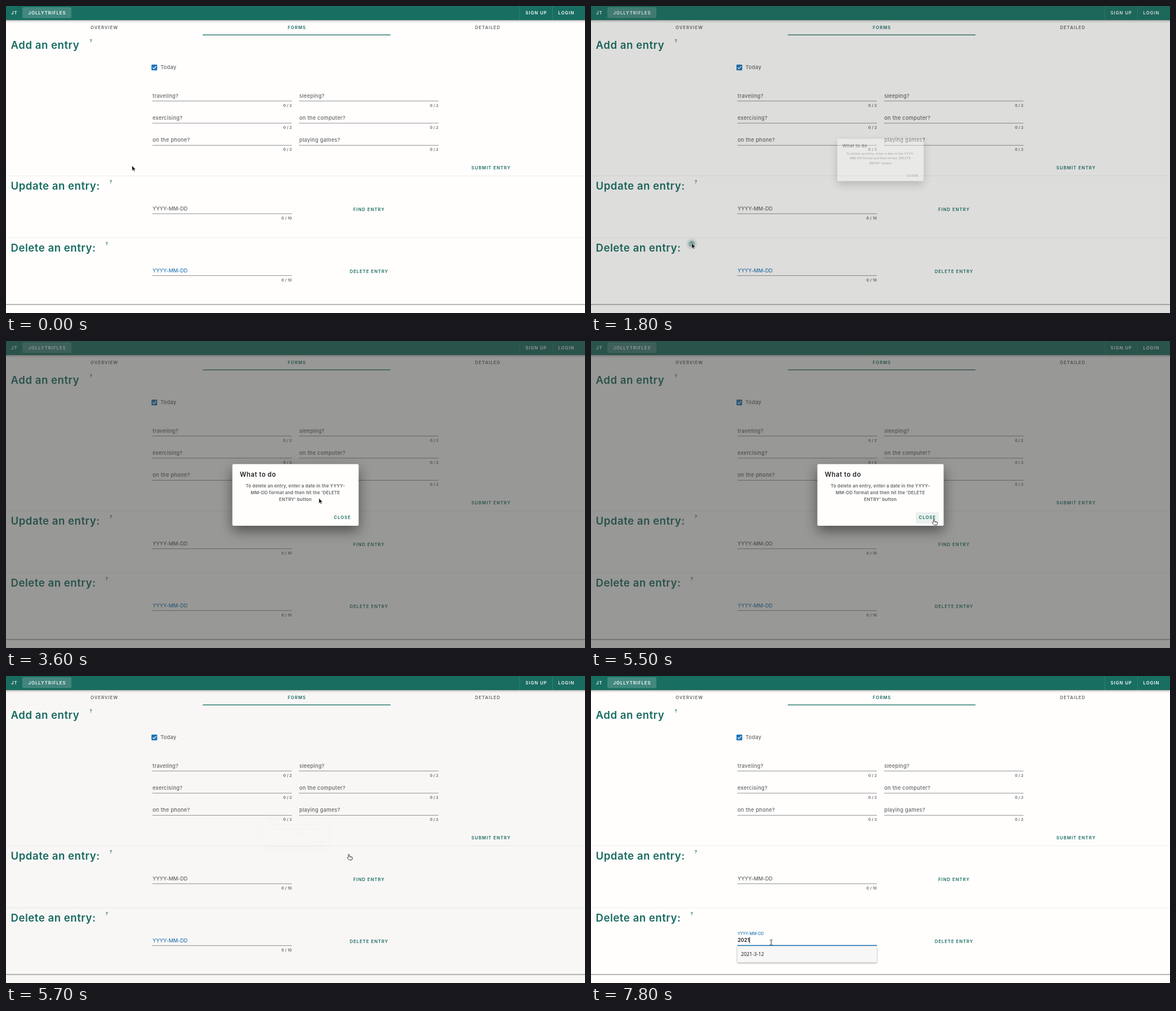
Recreate the animation shown at these times as an HTML page. Size 1027x545 px, loop 8000 ms.

```html
<!DOCTYPE html>
<html lang="en">
<head>
<meta charset="utf-8">
<title>Entry forms</title>
<style>
  html, body { margin: 0; width: 100%; height: 100%; overflow: hidden; background: #fffefd; }
  svg { display: block; width: 1027px; height: 545px; }
  text { font-family: Inter, sans-serif; font-weight: 600; white-space: pre; }
  .title { font-size: 18.6px; letter-spacing: .52px; fill: #176b60; }
  .button { font-size: 7.7px; letter-spacing: 1px; fill: #176b60; }
  .label { font-size: 9.2px; letter-spacing: .3px; fill: #666; font-weight: 550; }
  .date { letter-spacing: -.15px; }
  .count { font-size: 6.8px; letter-spacing: .1px; fill: #666; text-anchor: end; }
  .help { font-size: 8px; fill: #176b60; }
  .mid { text-anchor: middle; }
  .white { fill: #fff; }
  .grey { fill: #666; }
  .heading { font-size: 11.3px; letter-spacing: .5px; fill: #222; }
  .body { font-size: 7.9px; letter-spacing: .17px; fill: #666; }
  .typed { font-size: 9px; fill: #1c1c1c; }
  .option { font: 8.8px "Noto Sans", sans-serif; fill: #222; }
  .card { fill: #fffefd; filter: drop-shadow(0 1px 1px #0008); }
  .bar { fill: #186e61; filter: drop-shadow(0 1px 2px #0006); }
  .panel { fill: #fffefd; filter: drop-shadow(0 9px 11px #0007); }
  .menu { fill: #f8f7f7; filter: drop-shadow(0 1px 1.5px #0006); }
</style>
</head>
<body>
<svg id="stage" viewBox="0 0 1027 545"></svg>
<script>
const text = (x, y, cls, str, id = '') => `<text x="${x}" y="${y}" class="${cls}" id="${id}">${str}</text>`;
const rect = (x, y, w, h, attrs) => `<rect x="${x}" y="${y}" width="${w}" height="${h}" ${attrs}/>`;

function field(x, y, label, max, id = '') {
  const cls = max === 10 ? 'label date' : 'label';
  return text(0, 0, cls, label, id).replace('<text', `<text transform="translate(${x} ${y - 6})"`)
    + rect(x - .5, y - .5, 247.5, 1, 'fill="#939291"')
    + text(x + 247, y + 10, 'count', `0 / ${max}`);
}

function section(y, title, helpX) {
  return text(8.5, y, 'title', title) + text(helpX, y - 11, 'help mid', '?');
}

const questions = ['traveling?', 'sleeping?', 'exercising?', 'on the computer?', 'on the phone?', 'playing games?'];

const page = rect(-10, -10, 1047, 539, 'class="card"')
  + rect(-10, -5, 1047, 30, 'class="bar"')
  + rect(29, 2, 87, 19.5, 'rx="2.5" fill="#fff" opacity=".18"')
  + rect(910.5, 0, 1, 25, 'fill="#fff" opacity=".12"') + rect(969, 0, 1, 25, 'fill="#fff" opacity=".12"')
  + text(9, 14.8, 'button white', 'JT')
  + text(73, 14.8, 'button white mid', 'JOLLYTRIFLES')
  + text(921.5, 14.8, 'button white', 'SIGN UP')
  + text(979.5, 14.8, 'button white', 'LOGIN')
  + text(174.5, 41.4, 'button grey mid', 'OVERVIEW')
  + text(516, 41.4, 'button mid', 'FORMS')
  + text(854.5, 41.4, 'button grey mid', 'DETAILED')
  + rect(349, 50.7, 333, 1.3, 'fill="#176b60"')
  + section(76, 'Add an entry', 150.5) + section(326, 'Update an entry:', 186) + section(436.3, 'Delete an entry:', 178.7)
  + rect(258, 104, 10.2, 10.2, 'rx="1.2" fill="#1f75bb"')
  + '<path d="M260 109.2l2.2 2.2 4.2-4.4" fill="none" stroke="#fff" stroke-width="1.2"/>'
  + text(274, 112, 'label', 'Today')
  + questions.map((q, i) => field(260 + 260.2 * (i % 2), 168.7 + 39.3 * (i >> 1), q, 2)).join('')
  + text(860.5, 290, 'button mid', 'SUBMIT ENTRY')
  + rect(0, 301, 1027, 1, 'fill="#eeedeb"') + rect(0, 411, 1027, 1, 'fill="#eeedeb"')
  + field(260, 368.8, 'YYYY-MM-DD', 10) + text(644, 364, 'button mid', 'FIND ENTRY')
  + field(260, 478.6, 'YYYY-MM-DD', 10, 'dateLabel') + text(644, 474, 'button mid', 'DELETE ENTRY')
  + rect(259.5, 477.6, 247.5, 1.5, 'id="focusLine" fill="#1f75b4"')
  + text(260, 472.2, 'typed', '', 'typed')
  + rect(0, 463.5, .8, 11, 'id="caret"')
  + `<g id="menu">${rect(259.5, 480, 247.5, 28.5, 'class="menu"')}${text(266, 497.4, 'option', '2021-3-12')}</g>`
  + '<g fill="#176b60"><circle id="hover" cx="178.7" cy="422.2" r="9.8"/><circle id="ripple" cx="178.7" cy="422.2"/></g>';

const dialog = rect(401.5, 218.5, 224, 109.5, 'rx="2.2" class="panel"')
  + text(414.8, 240.6, 'heading', 'What to do')
  + ['To delete an entry, enter a date in the YYYY-', "MM-DD format and then hit the 'DELETE", "ENTRY' button"]
    .map((line, i) => text(513.3, 259.8 + 12.25 * i, 'body mid', line)).join('')
  + rect(576, 304, 41, 20, 'id="closeHover" rx="2" fill="#176b60"')
  + text(596.8, 316.4, 'button mid', 'CLOSE');

const cursors = {
  arrow: '<path d="M0 0V9.4L2.2 7.4 3.6 10.7 5.1 10 3.7 6.9H6.6Z" fill="#111" stroke="#fff" stroke-width=".6"/>',
  hand: '<path d="M3 6.2V1.5a.9.9 0 0 1 1.9 0V4.4l4.1.8q1.3.3 1.2 1.6L9.8 9l-.7 1.6H4.4L.8 7q.3-1.1 1.4-.6Z" fill="#fff" stroke="#222" stroke-width=".9"/><path d="M6.4 5v1.5M8.1 5.3v1.4" stroke="#222" stroke-width=".6"/>',
  beam: '<path d="M-2.5-4.7Q0-4.7 0-3.5Q0-4.7 2.5-4.7M0-3.6V3.6M-2.5 4.7Q0 4.7 0 3.5Q0 4.7 2.5 4.7" fill="none" stroke="#222" stroke-width=".9"/>',
};

document.getElementById('stage').innerHTML = page
  + rect(0, 0, 1027, 545, 'id="shade" fill="#3a3c38"')
  + `<g id="dialog">${dialog}</g><g id="cursor"></g>`;

const el = Object.fromEntries([...document.querySelectorAll('[id]')].filter(e => e.id).map(e => [e.id, e]));
const set = (name, attrs) => { for (const k in attrs) el[name].setAttribute(k, attrs[k]); };
const ramp = (t, from, length) => Math.min(1, Math.max(0, (t - from) / length));

// Cubic Bezier easing (.25, .8, x2, 1)
function ease(p, x2) {
  let lo = 0, hi = 1;
  const at = (u, a, b) => 3 * a * u * (1 - u) ** 2 + 3 * b * u * u * (1 - u) + u ** 3;
  for (let i = 0; i < 25; i++) {
    const mid = (lo + hi) / 2;
    if (at(mid, .25, x2) < p) lo = mid; else hi = mid;
  }
  return at(hi, .8, 1);
}

// time, x, y and, where it changes, the cursor shape
const path = [
  [0, 223.5, 283.3, 'arrow'], [400, 223.5, 283.3], [600, 227, 318], [700, 216.5, 346.5], [1000, 216.5, 346.5],
  [1100, 183, 414, 'hand'], [1200, 183, 414], [1300, 177, 420.5], [1400, 177, 420.5],
  [1500, 178.7, 421, 'arrow'], [1800, 178.7, 421], [1900, 177, 420.6], [2000, 177, 420.6],
  [2500, 500, 295], [2700, 500, 295], [3100, 421, 243], [3200, 421, 243], [3600, 555, 279],
  [3900, 574.5, 302, 'hand'], [4200, 574.5, 302], [4500, 598, 310], [4600, 598, 310],
  [5000, 585, 321], [5300, 598, 320], [5500, 604.3, 316], [5700, 604.3, 316],
  [5800, 560, 340, 'arrow'], [6100, 319.5, 473, 'beam'], [8000, 319.5, 473],
];

function moveCursor(t) {
  const next = path.findIndex(p => p[0] > t);
  const [t0, x0, y0] = path[next - 1], [t1, x1, y1] = path[next];
  const k = (t - t0) / (t1 - t0);
  set('cursor', { transform: `translate(${x0 + (x1 - x0) * k} ${y0 + (y1 - y0) * k})` });
  const shape = path.slice(0, next).findLast(p => p[3])[3];
  if (el.cursor.dataset.shape !== shape) {
    el.cursor.dataset.shape = shape;
    el.cursor.innerHTML = cursors[shape];
  }
}

function draw(t) {
  const opened = ramp(t, 1766, 300), closed = ramp(t, 5520, 300);
  const show = ease(opened, .25) * (1 - ease(closed, .25));
  set('shade', { opacity: .52 * ease(opened, .5) * (1 - ease(closed, .5)) });
  set('dialog', {
    opacity: show,
    transform: `translate(513.5 273.3) scale(${.5 + show / 2}) translate(-513.5 -273.3)`,
  });
  set('closeHover', { opacity: .09 * ramp(t, 4200, 200) });

  const fade = 1 - ramp(t, 1950, 400);
  set('hover', { opacity: t >= 1300 ? .11 * fade : 0 });
  set('ripple', { r: 6 + 3.8 * ramp(t, 1800, 100), opacity: t >= 1800 ? .33 * fade : 0 });

  const focus = ease(ramp(t, 6250, 300), .5);
  set('dateLabel', {
    transform: `translate(260 ${472.6 - 12.9 * focus}) scale(${1 - focus / 4})`,
    style: focus ? 'fill:#2f7cb8' : '',
  });
  set('focusLine', { x: 383.25 - 123.75 * focus, width: 247.5 * focus });
  set('menu', { opacity: ramp(t, 6500, 200) });

  const typedCount = [7200, 7200, 7300, 7800].filter(at => t >= at).length;
  el.typed.textContent = '2021'.slice(0, typedCount);
  set('caret', {
    x: 260 + el.typed.getComputedTextLength(),
    opacity: t >= 6300 && (t < 7000 || t >= 7200) ? 1 : 0,
  });
  moveCursor(t);
}

function tick() {
  draw(Math.floor(performance.now() % 8000 / 100) * 100);
  requestAnimationFrame(tick);
}
tick();
</script>
</body>
</html>
```
